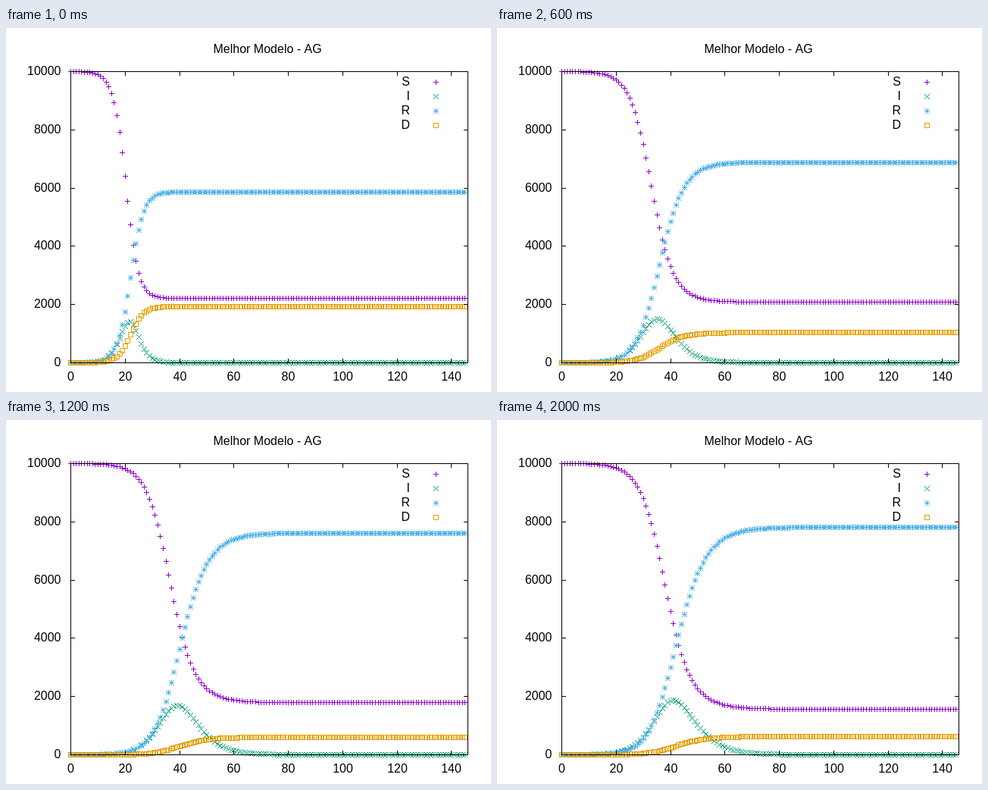
These frames come from a looping animation (640 by 480 pixels, 2800 ms). An HTML page with a canvas:

```html
<!DOCTYPE html>
<html lang="pt">
<head>
<meta charset="utf-8">
<title>Melhor Modelo - AG</title>
<style>
html, body { margin: 0; width: 100%; height: 100%; overflow: hidden; background: #fff; }
canvas { display: block; }
</style>
</head>
<body>
<canvas id="plot" width="640" height="480"></canvas>
<script>
const ctx = document.getElementById('plot').getContext('2d');
const LEFT = 85, RIGHT = 609, TOP = 57, BOTTOM = 441;
const POP = 10000, DAYS = 146, STEP = 200, LOOP = 2800;

// Each model: final S, final D, day on which S falls to half the population
const models = [
  [2213, 1927, 21.68],
  [2400, 1350, 24.5],
  [2578, 780, 27.64],
  [2085, 1035, 35.18],
  [2187, 560, 38.69],
  [1990, 580, 38.65],
  [1790, 600, 38.59],
  [1390, 633, 40.95],
  [1375, 635, 41.06],
  [1490, 630, 40.3],
  [1565, 625, 39.82]
];

// Daily SIRD steps from a single infected person
function simulate(beta, out, deathShare) {
  const run = { S: [], I: [], R: [], D: [] };
  let s = POP - 1, i = 1, removed = 0;
  for (let day = 0; day < DAYS; day++) {
    run.S.push(s);
    run.I.push(i);
    run.R.push(removed * (1 - deathShare));
    run.D.push(removed * deathShare);
    const fresh = beta * s * i / POP, gone = out * i;
    s -= fresh;
    i += fresh - gone;
    removed += gone;
  }
  return run;
}

function bisect(lo, hi, isLow) {
  for (let n = 0; n < 32; n++) {
    const mid = (lo + hi) / 2;
    if (isLow(mid)) lo = mid; else hi = mid;
  }
  return (lo + hi) / 2;
}

function halfDay(S) {
  const k = S.findIndex(v => v < POP / 2);
  return k < 1 ? DAYS : k - 1 + (S[k - 1] - POP / 2) / (S[k - 1] - S[k]);
}

// Find the rates that give the final S and the half day
function fit([endS, endD, half]) {
  const share = endD / (POP - endS);
  const runFor = out => {
    const ratio = bisect(1.2, 3, r => simulate(r * out, out, share).S[DAYS - 1] > endS);
    return simulate(ratio * out, out, share);
  };
  return runFor(bisect(0.14, 0.9, out => halfDay(runFor(out).S) > half));
}

const runs = models.map(fit);

const px = day => LEFT + Math.floor(day * (RIGHT - LEFT) / DAYS + 0.5);
const py = v => BOTTOM - Math.floor(v * (BOTTOM - TOP) / POP + 0.5);
const dot = (x, y, w = 1, h = 1) => ctx.fillRect(x, y, w, h);

function plus(x, y) {
  dot(x - 3, y, 7, 1);
  dot(x, y - 3, 1, 7);
}
function cross(x, y) {
  for (let k = -3; k <= 3; k++) {
    dot(x + k, y + k);
    dot(x + k, y - k);
  }
}
function star(x, y) {
  plus(x, y);
  cross(x, y);
}
function box(x, y) {
  dot(x - 3, y - 3, 7, 1);
  dot(x - 3, y + 3, 7, 1);
  dot(x - 3, y - 2, 1, 5);
  dot(x + 3, y - 2, 1, 5);
}

const series = [
  ['S', '#9400d3', plus],
  ['I', '#009e73', cross],
  ['R', '#56b4e9', star],
  ['D', '#e69f00', box]
];

function label(text, x, y, align) {
  ctx.fillStyle = '#000';
  ctx.textAlign = align;
  ctx.fillText(text, x, y);
}

function drawAxes() {
  ctx.fillStyle = '#000';
  dot(LEFT, TOP, RIGHT - LEFT + 1, 1);
  dot(LEFT, BOTTOM, RIGHT - LEFT + 1, 1);
  dot(LEFT, TOP, 1, BOTTOM - TOP + 1);
  dot(RIGHT, TOP, 1, BOTTOM - TOP + 1);
  for (let v = 0; v <= POP; v += 2000) {
    const y = py(v);
    dot(LEFT, y, 6, 1);
    dot(RIGHT - 5, y, 6, 1);
    label(v, 72.5, y + 5, 'right');
  }
  for (let day = 0; day <= 140; day += 20) {
    const x = px(day);
    dot(x, BOTTOM - 5, 1, 6);
    dot(x, TOP, 1, 6);
    label(day, x + 0.5, 465, 'center');
  }
  label('Melhor Modelo - AG', 273.5, 33, 'left');
}

function draw(run) {
  ctx.fillStyle = '#fff';
  ctx.fillRect(0, 0, 640, 480);
  ctx.font = '16px "Liberation Sans", Arial, sans-serif';
  series.forEach(([name, color, mark], n) => {
    const y = 71 + 19 * n;
    label(name, 533, y + 5, 'right');
    ctx.fillStyle = color;
    mark(567, y);
    run[name].forEach((v, day) => mark(px(day), py(v)));
  });
  drawAxes();
}

let shown = -1;
function tick() {
  const now = performance.now() % LOOP;
  const index = Math.min(runs.length - 1, Math.floor(now / STEP));
  if (index !== shown) draw(runs[shown = index]);
  requestAnimationFrame(tick);
}
tick();
</script>
</body>
</html>
```
